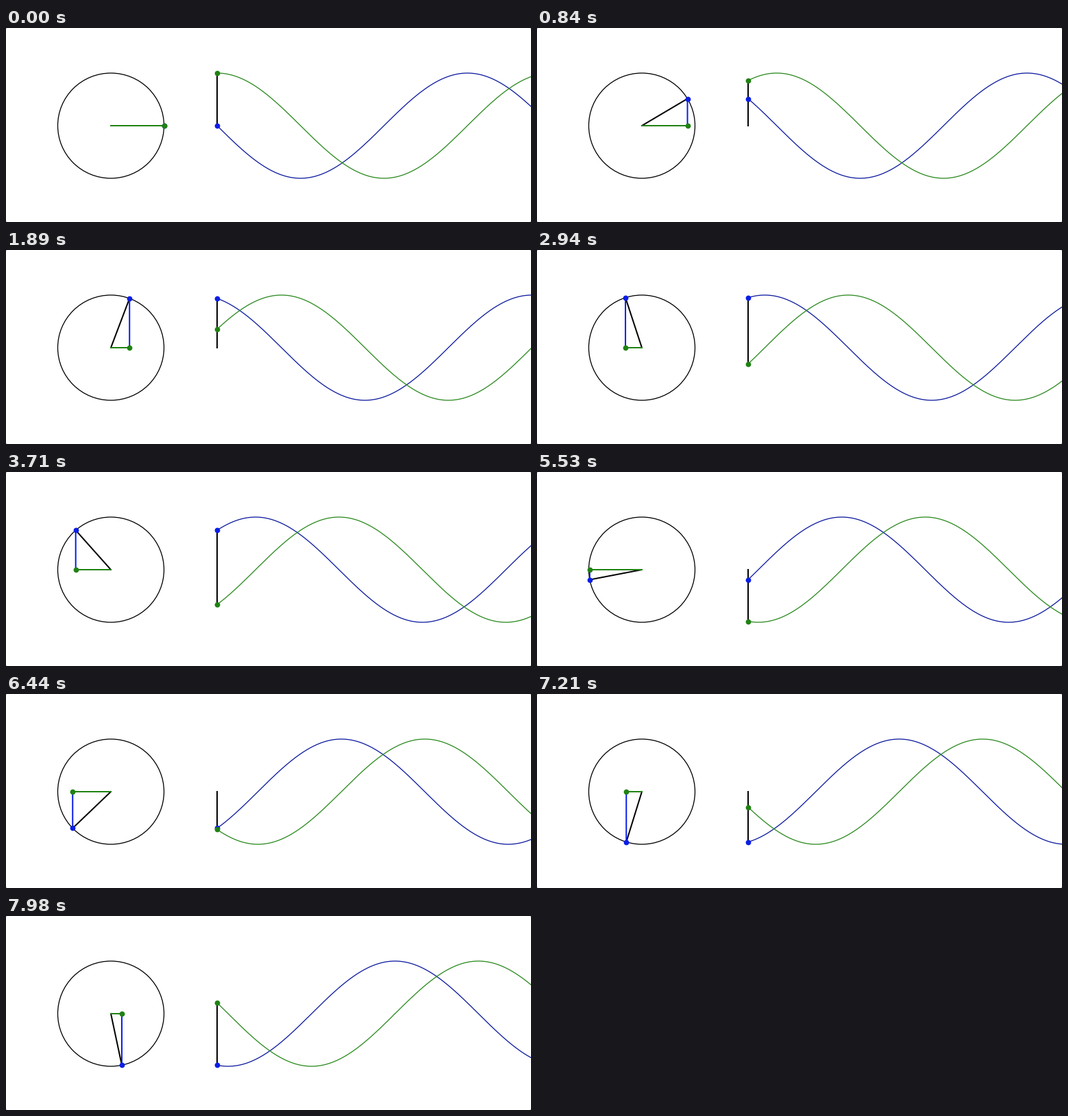
Animation of 766x284 px, one loop 8000 ms. Source, as a matplotlib script:

```python
import numpy as np
import matplotlib.pyplot as plt
from matplotlib.animation import FuncAnimation
from matplotlib.patches import Ellipse, Rectangle

W, H, DPI = 766, 284, 100
PX = 72 / DPI              # points per pixel
TICK, LOOP, STEP = 20, 8000, 70

CX, CY = 153, 143          # circle centre
RX, RY = 77.5, 77
BAR_X = 308                # where the waves start

BLACK = "#000000"
BLUE, GREEN = "#0a1ee6", "#1f8212"
BLUE_WAVE, GREEN_WAVE = "#0c1a9e", "#2a8a1e"

# Steady rotation with a short slow stretch between steps 48 and 60
KEY_STEPS = [0, 48, 60, 66, 92, 114]
KEY_ANGLES = [0, 123.43, 142.7, 158.0, 224.0, 281.9]

fig = plt.figure(figsize=(W / DPI, H / DPI), dpi=DPI, facecolor="white")
ax = fig.add_axes([0, 0, 1, 1])
ax.set_xlim(0, W)
ax.set_ylim(H, 0)
ax.axis("off")


def line(color, width, z):
    art, = ax.plot([], [], color=color, lw=width * PX, zorder=z, snap=False)
    return art


def dot(color, z):
    art, = ax.plot([], [], "o", color=color, ms=7.8 * PX, mew=0, zorder=z,
                   snap=False)
    return art


ax.add_patch(Ellipse((CX, CY), 2 * RX, 2 * RY, fill=False, ec=BLACK,
                     lw=1.3 * PX, zorder=1))
for x in (0, W - 1):
    for y in (0, H - 1):
        ax.add_patch(Rectangle((x, y), 1, 1, fc="#9a9a9a", lw=0))

sin_wave = line(BLUE_WAVE, 1.3, 2)
cos_wave = line(GREEN_WAVE, 1.3, 3)
radius = line(BLACK, 2, 4)
sin_leg = line(BLUE, 2, 5)
cos_leg = line(GREEN, 2, 6)
bar = line(BLACK, 2, 4)
sin_dots = dot(BLUE, 7)
cos_dots = dot(GREEN, 8)
artists = [sin_wave, cos_wave, radius, sin_leg, cos_leg, bar,
           sin_dots, cos_dots]

wave_x = np.arange(BAR_X, W + 3)
lag = (wave_x - BAR_X) / RX


def draw(i):
    step = (i * TICK + TICK // 2) // STEP
    a = np.radians(np.interp(step, KEY_STEPS, KEY_ANGLES))
    x, y = CX + RX * np.cos(a), CY - RY * np.sin(a)
    cos_y = CY - RY * np.cos(a)

    sin_wave.set_data(wave_x, CY - RY * np.sin(a - lag))
    cos_wave.set_data(wave_x, CY - RY * np.cos(a - lag))
    radius.set_data([CX, x], [CY, y])
    sin_leg.set_data([x, x], [CY, y])
    cos_leg.set_data([CX, x], [CY, CY])
    bar.set_data([BAR_X, BAR_X], [min(CY, y, cos_y), max(CY, y, cos_y)])
    sin_dots.set_data([x, BAR_X], [y, y])
    cos_dots.set_data([x, BAR_X], [CY, cos_y])
    return artists


anim = FuncAnimation(fig, draw, frames=LOOP // TICK, interval=TICK,
                     init_func=lambda: draw(0), repeat=True, repeat_delay=0,
                     blit=True)
plt.show()
```
